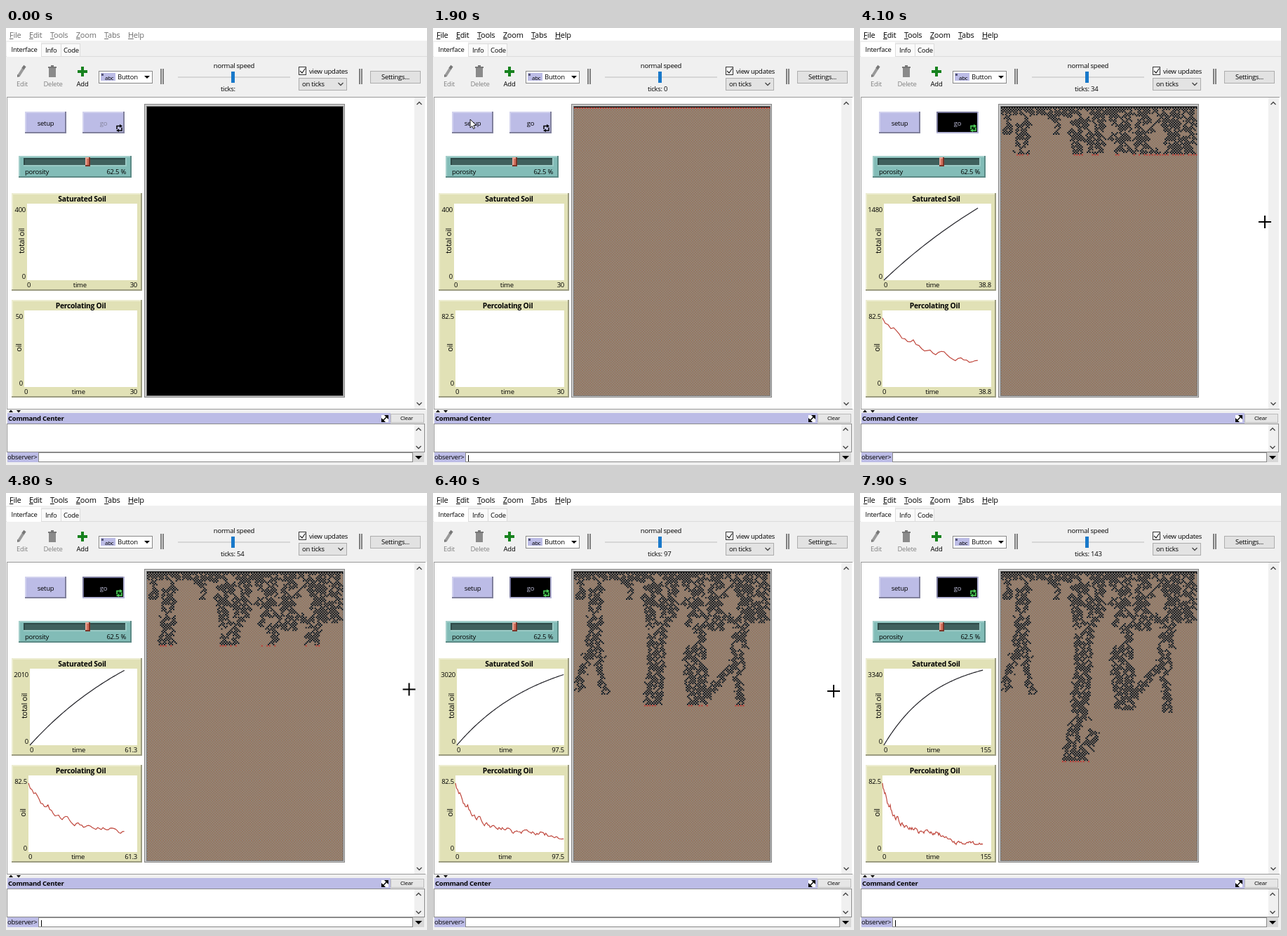
An HTML page with a canvas for the animation above (8 s loop, 600 by 622 pixels).

```html
<!DOCTYPE html>
<html lang="en">
<head>
<meta charset="utf-8">
<title>Oil percolation</title>
<style>
  html, body { margin: 0; width: 600px; height: 622px; overflow: hidden; background: #f0f0f0; }
  canvas { display: block; }
</style>
</head>
<body>
<canvas id="stage" width="600" height="622"></canvas>
<script>
const LOOP = 8000, READY = 1900, GO = 2800;
const COLS = 151, ROWS = 222, CELL = 1.85, VIEW_X = 201, VIEW_Y = 113;
const LAVENDER = '#bcbce6', PANEL = '#f0f0f0';
const ctx = document.getElementById('stage').getContext('2d');

// ---------- drawing helpers ----------
function rect(x, y, w, h, color) {
  ctx.fillStyle = color;
  ctx.fillRect(x, y, w, h);
}
function trace(points) {
  ctx.beginPath();
  for (let i = 0; i < points.length; i += 2) ctx.lineTo(points[i], points[i + 1]);
}
function line(points, color, width = 1) {
  trace(points);
  ctx.strokeStyle = color;
  ctx.lineWidth = width;
  ctx.stroke();
}
function shape(points, color) {
  trace(points);
  ctx.fillStyle = color;
  ctx.fill();
}
function box(x, y, w, h, fill, edge) {
  rect(x, y, w, h, edge);
  rect(x + 1, y + 1, w - 2, h - 2, fill);
}
function bevel(x, y, w, h, fill, light, dark) {
  rect(x, y, w, h, dark);
  rect(x, y, w - 2, h - 2, light);
  rect(x + 2, y + 2, w - 4, h - 4, fill);
}
function text(str, x, y, { size = 9.5, bold = false, color = '#000', align = 'left' } = {}) {
  ctx.font = `${bold ? 'bold ' : ''}${size}px "Open Sans", "Noto Sans", sans-serif`;
  ctx.letterSpacing = '-0.25px';
  ctx.textAlign = align;
  ctx.fillStyle = color;
  ctx.fillText(str, x, y);
  return ctx.measureText(str).width;
}
function chevron(x, y, dir) {
  line([x - 3.5, y - 2 * dir, x, y + 1.5 * dir, x + 3.5, y - 2 * dir], '#444', 1.3);
}
const mix = (a, b, f) => a + (b - a) * f;

// Interpolates rows of [key, ...values].
function along(keys, k) {
  const next = keys.findIndex(row => row[0] >= k);
  if (next < 0) return keys[keys.length - 1].slice(1);
  if (next === 0) return keys[0].slice(1);
  const a = keys[next - 1], b = keys[next];
  return a.slice(1).map((v, i) => mix(v, b[i + 1], (k - a[0]) / (b[0] - a[0])));
}

let seed = 77;
function random() {
  seed = (seed * 1664525 + 1013904223) % 4294967296;
  return seed / 4294967296;
}

// ---------- percolation ----------
// Channels the oil can follow: x1, y1, x2, y2, width.
const channels = [
  [209, 113, 208, 150, 14], [232, 113, 229, 200, 20], [226, 195, 207, 282, 16], [230, 195, 245, 286, 16],
  [276, 113, 277, 150, 16], [308, 113, 320, 190, 32], [320, 190, 312, 310, 26], [312, 300, 294, 382, 18],
  [314, 300, 338, 352, 18], [330, 340, 312, 382, 22], [340, 113, 341, 182, 16], [370, 113, 375, 308, 32],
  [404, 113, 402, 195, 26], [452, 113, 446, 185, 60], [440, 185, 430, 250, 24], [428, 240, 386, 292, 16],
  [432, 240, 437, 312, 14],
];
function porous(x, y) {
  return y < 124 || channels.some(([x1, y1, x2, y2, w]) =>
    y >= y1 && y <= y2 && Math.abs(x - mix(x1, x2, (y - y1) / (y2 - y1))) < w * mix(.4, .65, random()));
}

const oil = [];
for (let r = 0; r < ROWS; r++) {
  const row = new Set();
  for (let c = r % 2; c < COLS; c += 2) {
    const fed = r > 0 && (oil[r - 1].has(c - 1) || oil[r - 1].has(c + 1) || random() < .08);
    if (r === 0 || fed && random() < .79 && porous(VIEW_X + c * CELL, VIEW_Y + r * CELL)) row.add(c);
  }
  oil.push(row);
}

// The checkered soil is painted once.
const soil = document.createElement('canvas');
soil.width = 279;
soil.height = 410;
const soilCtx = soil.getContext('2d');
soilCtx.fillStyle = '#908880';
soilCtx.fillRect(0, 0, 279, 410);
soilCtx.fillStyle = '#997459';
for (let r = 0; r < ROWS; r++)
  for (let c = r % 2; c < COLS; c += 2) soilCtx.fillRect(c * CELL, r * CELL, CELL, CELL);

function drawView(t) {
  box(197, 108, 286, 418, '#cbcbcb', '#858585');
  box(200, 111, 281, 413, '#000', '#777');
  if (t < READY - 100) return;
  ctx.drawImage(soil, VIEW_X, VIEW_Y);
  if (t < READY) return;
  const front = Math.max(0, Math.round((t - GO - 25) * .0285));
  for (let r = 0; r <= front; r++) {
    ctx.fillStyle = r === front ? '#c23a30' : '#10161c';
    for (const c of oil[r]) ctx.fillRect(VIEW_X + c * CELL, VIEW_Y + r * CELL, 2, 2);
  }
}

// ---------- plots ----------
const tickKeys = [[GO, 0], [3000, 5], [4100, 34], [5500, 74], [6400, 97], [7900, 143]];
const totalOil = k => 3900 * (1 - Math.exp(-k / 76));
let drift = 0;
const percolating = Array.from({ length: 160 }, (_, k) => {
  drift = drift * .7 + (random() - .5) * 7 * Math.exp(-k / 150);
  return 19 + 56 * Math.exp(-k / 18) - 10 / (1 + Math.exp((92 - k) / 3)) + (k && drift);
});

function timeLimit(ticks) {
  let limit = 30;
  while (limit < ticks) limit = +((Math.floor(limit) + 1) * 1.25).toPrecision(3);
  return limit;
}
function totalLimit(total) {
  let limit = 397;
  while (limit < total) limit *= 1.1067;
  return Math.round(limit / 10) * 10;
}

function plot({ y, x, title, titleX, label, value, ymax, color, ticks }) {
  bevel(8, y, 186, 139, '#e1e1b6', '#ededd2', '#9c9c80');
  text(title, titleX, y + 11.5, { size: 10.3, bold: true, align: 'center' });
  rect(x, y + 15, 187 - x, 109, '#fff');
  text(ymax, x - 2, y + 27, { align: 'right' });
  text('0', x - 2, y + 122, { align: 'right' });
  const xmax = timeLimit(ticks);
  text('0', x, y + 134);
  const w = text(xmax, 187, y + 134, { align: 'right' });
  text('time', (x + 191 - w) / 2, y + 134, { align: 'center' });
  ctx.save();
  ctx.translate(x - 4, y + 68);
  ctx.rotate(-Math.PI / 2);
  text(label, 0, 0, { size: 11, align: 'center' });
  ctx.restore();
  const points = [];
  for (let k = 0; k <= ticks; k++)
    points.push(x + k / xmax * (187 - x), y + 124 - value(k) / ymax * 108);
  if (ticks > 0) line(points, color, 1.2);
}

function drawPlots(t, ticks) {
  const totalMax = totalLimit(totalOil(ticks));
  plot({ y: 235, x: totalMax > 999 ? 34 : 30, title: 'Saturated Soil', titleX: 108.5, label: 'total oil',
    value: totalOil, ymax: totalMax, color: '#222228', ticks });
  plot({ y: 387, x: t < READY ? 26 : 32, title: 'Percolating Oil', titleX: 106.5, label: 'oil',
    value: k => percolating[k], ymax: t < READY ? 50 : 82.5, color: '#c0483e', ticks });
}

// ---------- window ----------
function drawMenu(active) {
  rect(0, 0, 600, 18, '#fff');
  const color = active ? '#000' : '#6d6d6d';
  let x = 5;
  for (const item of ['File', 'Edit', 'Tools', 'Zoom', 'Tabs', 'Help']) {
    const w = text(item, x, 13.5, { size: 11, color });
    rect(x, 15, ctx.measureText(item[0]).width, 1, color);
    x += w + 11.5;
  }
}

function drawToolbar(t, ticks) {
  rect(0, 18, 600, 80, PANEL);
  box(50, 22, 56, 19, '#fafafa', '#dcdcdc');
  rect(78, 22, 1, 18, '#dcdcdc');
  rect(0, 40, 600, 1, '#dcdcdc');
  rect(1, 20, 49, 21, '#fff');
  text('Interface', 7.5, 33.5);
  text('Info', 56, 35);
  text('Code', 82, 35);

  const gray = { color: '#808080', align: 'center' };
  line([18, 68, 25, 57], '#999', 4);
  line([24, 58, 27, 54], '#777', 4);
  shape([16, 70, 16, 66, 20, 69], '#777');
  text('Edit', 23, 82.5, gray);
  rect(61, 57, 10, 13, '#8a8a8a');
  rect(60, 55, 12, 2, '#777');
  rect(64, 53, 4, 2, '#777');
  text('Delete', 67, 82.5, gray);
  rect(107, 55, 4, 14, '#16821e');
  rect(102, 60, 14, 4, '#16821e');
  text('Add', 109, 82.5, { align: 'center' });

  box(132, 61, 77, 18, '#fff', '#888');
  rect(135, 64, 21, 11, LAVENDER);
  text('abc', 141, 74, { size: 8 });
  rect(136, 65, 3, 3, '#557');
  text('Button', 159, 73);
  shape([197, 68, 205, 68, 201, 72], '#000');

  for (const x of [220, 223, 503, 506]) rect(x, 58, 2, 22, '#808080');
  text('normal speed', 325, 57, { align: 'center' });
  rect(245, 69, 160, 2, '#d6d6d6');
  rect(321, 62, 5, 16, '#1979ca');
  text(t < READY ? 'ticks:' : `ticks: ${ticks}`, 306, 90);

  box(417, 55, 11, 12, '#fff', '#333');
  line([419, 61, 422, 64, 426.5, 57.5], '#222', 1.2);
  text('view updates', 432, 65);
  box(417, 71, 69, 18, '#e3e3e3', '#adadad');
  text('on ticks', 422, 83);
  chevron(477, 80, 1);
  box(519, 61, 72, 18, '#e2e2e2', '#adadad');
  text('Settings...', 555, 73, { align: 'center' });
}

function drawCommandCenter(caret) {
  rect(0, 543, 600, 79, PANEL);
  rect(1, 542, 597, 1, '#999');
  shape([4, 547, 10, 547, 7, 543.5], '#000');
  shape([15, 544, 21, 544, 18, 547.5], '#000');
  rect(2, 548, 546, 15, LAVENDER);
  text('Command Center', 3, 559, { bold: true });
  rect(535, 551, 10, 10, '#fff');
  shape([539, 551, 545, 551, 545, 557], '#000');
  shape([535, 555, 535, 561, 541, 561], '#000');
  line([537, 559, 543, 553], '#000', 1.5);
  box(548, 549, 48, 13, '#e6e6e6', '#bbb');
  text('Clear', 571, 558, { size: 8, align: 'center' });
  box(1, 563, 596, 41, '#fff', '#8c8c8c');
  rect(582, 564, 14, 39, PANEL);
  chevron(588, 571, -1);
  chevron(588, 597, 1);
  rect(2, 604, 45, 14, LAVENDER);
  text('observer>', 2, 614);
  box(46, 604, 534, 14, '#fff', '#888');
  rect(580, 604, 16, 14, '#d8d8d8');
  shape([583, 609, 593, 609, 588, 614], '#000');
  if (caret) rect(50, 608, 1, 9, '#000');
}

function button(x, w, label, pressed, color) {
  if (pressed) bevel(x, 119, w, 31, '#000', '#77779a', '#b4b4d6');
  else bevel(x, 119, w, 31, LAVENDER, '#d2d2ee', '#80809c');
  text(label, x + w / 2, 139, { color, align: 'center' });
}

function drawControls(t) {
  const setupDown = t >= 1300 && t < READY, goDown = t >= GO;
  button(27, 59, 'setup', setupDown, setupDown ? '#85859a' : '#000');
  button(109, 60, 'go', goDown, goDown ? '#bcbcd8' : t < READY ? '#84849c' : '#000');
  const arrows = goDown ? '#4fd05a' : '#000';
  rect(157, 138, 9, 9, goDown ? '#0a3010' : LAVENDER);
  line([158, 144, 158, 139.5, 163, 139.5], arrows, 1.5);
  line([160, 146, 165, 146, 165, 141.5], arrows, 1.5);
  shape([162, 137, 166, 139.5, 162, 142], arrows);
  shape([161, 143.5, 157, 146, 161, 148], arrows);

  bevel(18, 182, 161, 31, '#82bcb7', '#a4cfcb', '#5c8a86');
  bevel(25, 185, 147, 12, '#3f605d', '#2f4a48', '#9acac5');
  bevel(113, 184, 7, 13, '#d2705c', '#e8a596', '#7c3428');
  text('porosity', 27, 208);
  text('62.5 %', 171, 208, { align: 'right' });
}

// ---------- pointer: time, x, y ----------
const pointerPath = [[100, 573, 300], [500, 330, 90], [900, 70, 62], [1200, 53, 130], [READY, 53, 130],
  [2200, 158, 130], [3700, 158, 130], [4000, 579, 268], [4100, 577, 276], [5500, 572, 283],
  [6400, 571, 282], [6900, 615, 280]];

function drawPointer(t) {
  if (t < 200) return;
  const [x, y] = along(pointerPath, t);
  if (t >= 1300 && t < READY) {
    [[0, 6.3, '#1685d8'], [t / 160, 1.5, '#7cc9f8']].forEach(([from, sweep, color]) => {
      ctx.beginPath();
      ctx.arc(54, 132, 6, from, from + sweep);
      ctx.strokeStyle = color;
      ctx.lineWidth = 3.4;
      ctx.stroke();
    });
  } else if (y < 98 || t > 900 && t <= 3700) {
    const arrow = [0, 0, 0, 12, 2.8, 9.5, 4.6, 13.5, 6.6, 12.6, 4.9, 8.7, 8.6, 8.4, 0, 0]
      .map((v, i) => v + (i % 2 ? y : x));
    shape(arrow, '#fff');
    line(arrow, '#000', .9);
  } else {
    rect(x - 9, y - 1, 18, 2, '#000');
    rect(x - 1, y - 9, 2, 18, '#000');
  }
}

function draw(now) {
  const t = Math.floor(now % LOOP / 100) * 100;
  const ticks = Math.round(along(tickKeys, t)[0]);
  drawMenu(t >= 100);
  drawToolbar(t, ticks);
  rect(0, 98, 600, 445, '#fff');
  rect(1, 98, 597, 1, '#999');
  rect(1, 98, 1, 445, '#999');
  rect(582, 99, 15, 443, PANEL);
  chevron(589, 107, -1);
  chevron(589, 535, 1);
  drawControls(t);
  drawPlots(t, ticks);
  drawView(t);
  drawCommandCenter(t > 500 && t % 1000 > 550);
  drawPointer(t);
}

const start = performance.now();
function tick() {
  draw(performance.now() - start);
  requestAnimationFrame(tick);
}
tick();
</script>
</body>
</html>
```
